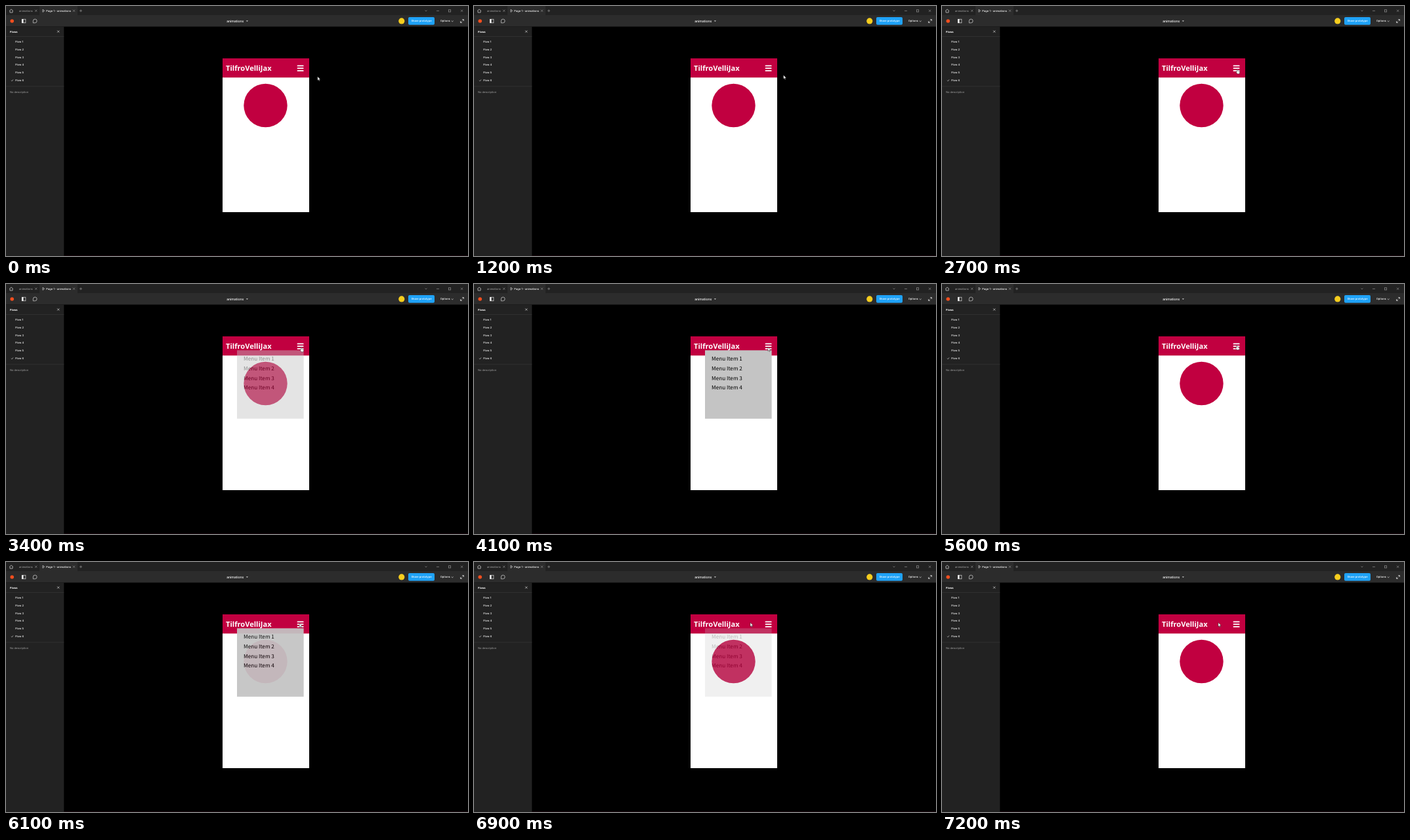
An HTML page for the animation above (7.8 s loop, 704 by 382 pixels).

```html
<!DOCTYPE html>
<html lang="en">
<head>
<meta charset="utf-8">
<title>Prototype menu</title>
<style>
  html, body { margin: 0; width: 100%; height: 100%; overflow: hidden; background: #000; }
  svg { display: block; width: 100vw; height: 100vh; }
  text { font: 500 4.05px Inter, sans-serif; fill: #fff; text-rendering: geometricPrecision; }
  .dim { fill: #a5a5a5; font-weight: 400; }
  .brand { font: 700 11.1px "Open Sans", "Noto Sans", sans-serif; }
  .item { font: 400 8.2px "Noto Sans CJK JP", "Noto Sans", sans-serif; fill: #000; }
  .line { fill: none; stroke: #e6e6e6; stroke-width: .65; }
  .faint { stroke: #999; }
  .crimson { fill: #c10040; }
</style>
</head>
<body>
<svg viewBox="0 0 704 382" preserveAspectRatio="none">
  <defs>
    <path id="cross" d="m-1.6-1.6 3.2 3.2m0-3.2-3.2 3.2"/>
    <path id="chevron" d="m-1.5-.7 1.5 1.4 1.5-1.4"/>
    <path id="corner" d="M0-2.5h2.5V0m0-2.5L.4-.4"/>
  </defs>
  <rect width="704" height="382"/>
  <rect y="381" width="704" height="1" fill="#17060c"/>

  <!-- window tabs -->
  <rect width="704" height="14" fill="#222"/>
  <rect x="51" width="58" height="14" fill="#2c2c2c"/>
  <path class="line" d="M5.2 7.3 8 4.9l2.8 2.4M6 7v3h4V7"/>
  <text class="dim" x="20" y="8.8">animations</text>
  <path class="line" d="m56 5.3 2.6 2-2.6 2z"/>
  <text x="61.3" y="8.8">Page 1 - animations</text>
  <g class="line faint">
    <use href="#cross" x="45.7" y="7.3"/>
    <use href="#cross" x="103.5" y="7.3"/>
    <path d="M112 7.3h4m-2-2v4"/>
    <use href="#chevron" x="640" y="7.3"/>
    <path d="M656 7.4h4"/>
    <rect x="674.5" y="5.8" width="3.2" height="3.2"/>
    <use href="#cross" x="694.6" y="7.3"/>
  </g>

  <!-- toolbar -->
  <rect y="13.9" width="704" height="17.6" fill="#2c2c2c"/>
  <circle cx="9.2" cy="23" r="2.8" fill="#f24e1e"/>
  <rect class="line" x="24.3" y="20.2" width="5.6" height="5.6"/>
  <rect x="24" y="20" width="2.5" height="6" fill="#fff"/>
  <path class="line" d="M41.3 25.8v-2.9a2.9 2.9 0 1 1 2.9 2.9z"/>
  <text x="336.2" y="24.8" style="font-size:5px">animations</text>
  <path fill="#ccc" d="M365.8 22.2h3.2l-1.6 1.8z"/>
  <circle cx="602.8" cy="22.9" r="4.6" fill="#f6cd1e"/>
  <rect x="613" y="17" width="40" height="11.7" rx="2" fill="#1fa2f7"/>
  <text x="633" y="24.4" text-anchor="middle">Share prototype</text>
  <text x="661.7" y="24.4">Options</text>
  <g class="line">
    <use href="#chevron" x="680.2" y="23.2"/>
    <use href="#corner" x="695" y="23"/>
    <use href="#corner" transform="rotate(180 347.5 11.5) translate(0 0)" x="0" y="0"/>
  </g>

  <!-- sidebar -->
  <rect y="31.5" width="88.3" height="350.5" fill="#222"/>
  <text x="6" y="40.5" style="font-weight:700">Flows</text>
  <use class="line" href="#cross" x="79.7" y="39"/>
  <path stroke="#3c3c3c" stroke-width=".6" d="M0 46.6h88.3M0 122.8h88.3"/>
  <g id="flows"></g>
  <path class="line" d="m8 113.7 1 1 1.8-2.2"/>
  <text class="dim" x="6" y="133.3">No description</text>

  <!-- phone -->
  <rect x="330" y="80" width="132" height="235" fill="#fff"/>
  <rect class="crimson" x="330" y="80" width="132" height="29.3"/>
  <text class="brand" x="335" y="99">TilfroVelliJax</text>
  <path stroke="#fff" stroke-width="1.8" stroke-linecap="round" d="M444.5 91.4h8.2m-8.2 3.7h8.2m-8.2 3.8h8.2"/>
  <circle class="crimson" cx="395.5" cy="152" r="33.2"/>
  <g id="menu" opacity="0">
    <rect x="352" y="101.3" width="101.6" height="104.5" fill="#c4c4c4"/>
  </g>

  <g id="cursor" stroke="#000" stroke-width=".4" fill="#fff">
    <path id="arrow" d="M0 0v6.1l1.4-1.3.9 2.2 1-.4-.9-2.1h1.9z"/>
    <path id="hand" d="M1.5.6q.7-.7 1.4 0v2l2.3.5q.8.2.8 1L5.4 7.3H2.4L.2 4.6q0-.9.8-.6l.5.4z"/>
  </g>
</svg>
<script>
const LOOP = 7800, STEP = 100;
const el = id => document.getElementById(id);
const clamp = v => Math.min(1, Math.max(0, v));

function addText(parent, x, y, text, className = "") {
  const node = document.createElementNS(parent.namespaceURI, "text");
  node.setAttribute("x", x);
  node.setAttribute("y", y);
  node.setAttribute("class", className);
  node.textContent = text;
  parent.append(node);
}
for (let i = 0; i < 6; i++) addText(el("flows"), 14.2, 56.2 + i * 11.76, `Flow ${i + 1}`);
for (let i = 0; i < 4; i++) addText(el("menu"), 362, 117.2 + i * 14.7, `Menu Item ${i + 1}`, "item");

const rest = { x: 474.8, y: 107.7 };
const moves = [
  { from: 1100, to: 1600, x: 458.6, y: 96.6 },
  { from: 1800, to: 2300, x: 453.6, y: 96.4 },
  { from: 2400, to: 2700, x: 447.8, y: 96.4 },
  { from: 4100, to: 4300, x: 411.6, y: 88.2 },
  { from: 5000, to: 5500, x: 447, y: 93.5 },
  { from: 6200, to: 6500, x: 421, y: 92.6 }
];

function pointerAt(t) {
  return moves.reduce((p, { from, to, x, y }) => {
    const k = clamp((t - from) / (to - from));
    return { x: p.x + (x - p.x) * k, y: p.y + (y - p.y) * k };
  }, rest);
}

// Ease-out over four steps, the first one already visible at start
const dissolve = (t, start) => 1 - (1 - clamp((t - start + STEP) / (4 * STEP))) ** 2;
const menuOpacity = t =>
  dissolve(t, 3400) - dissolve(t, 4800) + dissolve(t, 5900) - dissolve(t, 6800);

const start = performance.now();
function draw() {
  const elapsed = Math.max(0, performance.now() - start) % LOOP;
  const t = Math.floor(elapsed / STEP) * STEP;
  const { x, y } = pointerAt(t);
  const opacity = menuOpacity(t);
  const overIcon = x > 445 && x < 450;
  const hand = overIcon && opacity < .9;
  el("menu").setAttribute("opacity", opacity);
  el("cursor").setAttribute("transform", `translate(${x} ${y})`);
  el("arrow").setAttribute("visibility", hand ? "hidden" : "visible");
  el("hand").setAttribute("visibility", hand ? "visible" : "hidden");
  requestAnimationFrame(draw);
}
draw();
</script>
</body>
</html>
```
